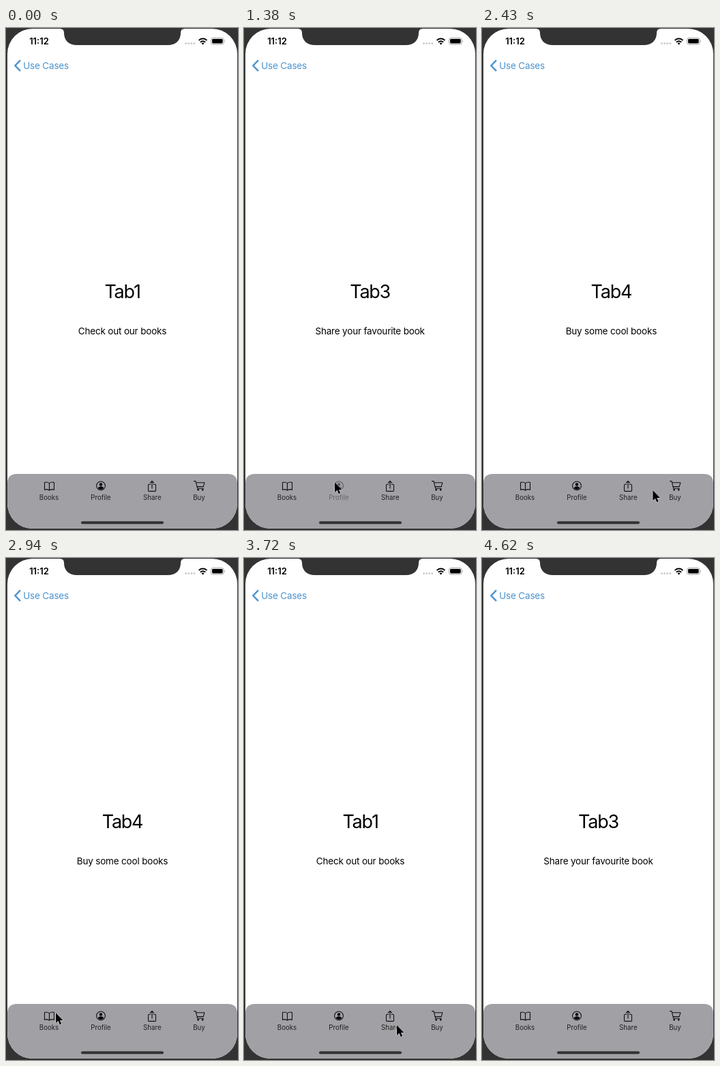
Recreate the animation shown at these times as an HTML page. Size 340 px wide and 734 px high, loop 4680 ms.

```html
<!DOCTYPE html>
<html lang="en">
<head>
<meta charset="utf-8">
<title>Tabs</title>
<style>
  html, body { margin: 0; width: 100%; height: 100%; overflow: hidden; background: #333; }
  svg { display: block; width: 340px; height: 734px; font-family: Inter, Roboto, sans-serif; }
  .title { font-size: 27px; letter-spacing: -1.25px; text-anchor: middle; }
  .body { font-size: 13.5px; letter-spacing: -.18px; }
  .mid { text-anchor: middle; }
  .clock { font-size: 13px; font-weight: 600; text-anchor: middle; }
  .label { font-size: 9.7px; text-anchor: middle; fill: #222; }
  .line { fill: none; stroke: #111; stroke-width: 1.1; stroke-linecap: round; stroke-linejoin: round; }
</style>
</head>
<body>
<svg viewBox="0 0 340 734">
  <defs>
    <clipPath id="screen"><rect x="2" y="1" width="337" height="731" rx="37"/></clipPath>
  </defs>
  <rect width="340" height="734" fill="#333"/>
  <g clip-path="url(#screen)">
    <rect width="340" height="734" fill="#fff"/>
    <g id="pages"></g>

    <path d="M79 0V1Q85 1 85 7C85 18 92 25 104 25H237C249 25 256 18 256 7Q256 1 262 1V0Z" fill="#333"/>
    <text class="clock" x="48.5" y="24">11:12</text>
    <g fill="#ccc">
      <circle cx="263.6" cy="22.5" r="1.5"/><circle cx="267.7" cy="22.5" r="1.5"/>
      <circle cx="271.8" cy="22.5" r="1.5"/><circle cx="275.9" cy="22.5" r="1.5"/>
    </g>
    <g fill="none" stroke="#000" stroke-width="2">
      <path d="M282.6 18.1a8.2 8.2 0 0 1 11.8 0"/>
      <path d="M284.9 20.7a5 5 0 0 1 7.2 0"/>
    </g>
    <path d="M288.5 24.6l-2-2.1a2.9 2.9 0 0 1 4 0z"/>
    <rect x="300.5" y="14.6" width="18.6" height="9.4" rx="2.6" fill="none" stroke="#999" stroke-width=".9"/>
    <rect x="302" y="16.1" width="15.6" height="6.4" rx="1.4"/>
    <path d="M320.2 17.7q1.5 1.6 0 3.2z" fill="#999"/>

    <path d="M21 47.2L13.4 55L21 62.8" fill="none" stroke="#4a93ce" stroke-width="2.4"/>
    <text class="body" x="25.2" y="60" fill="#4a93ce">Use Cases</text>

    <path d="M2 734V666Q2 652 16 652H325Q339 652 339 666V734Z" fill="#a1a0a5"/>
    <g class="tab">
      <path class="line" d="M63.5 665.6Q60 663 56.5 664.6V675.2Q60 673.8 63.5 676Q67 673.8 70.5 675.2V664.6Q67 663 63.5 665.6V676"/>
      <text class="label" x="63" y="689.5">Books</text>
    </g>
    <g class="tab">
      <circle class="line" cx="139" cy="669.4" r="6.4"/>
      <circle cx="139" cy="667.4" r="2.2"/>
      <path d="M134.7 672.8Q135.6 670.3 139 670.3T143.3 672.8Q141.6 674.7 139 674.7T134.7 672.8Z"/>
      <text class="label" x="139" y="689.5">Profile</text>
    </g>
    <g class="tab">
      <path class="line" d="M211.8 667.3H209.6Q208.5 667.3 208.5 668.4V676.3Q208.5 677.4 209.6 677.4H218.4Q219.5 677.4 219.5 676.3V668.4Q219.5 667.3 218.4 667.3H216.2M214 673V662.5M211.4 665L214 662.4L216.6 665"/>
      <text class="label" x="214.3" y="689.5">Share</text>
    </g>
    <g class="tab">
      <path class="line" d="M275.5 662.6H278L280.6 673.2H289.4M278.6 664.8H290.8L289.2 670.6H280"/>
      <circle cx="281.6" cy="675.3" r="1.2"/><circle cx="288.2" cy="675.3" r="1.2"/>
      <text class="label" x="283" y="689.5">Buy</text>
    </g>
    <rect x="110" y="721.3" width="121" height="4" rx="2" fill="#333"/>
  </g>
  <path id="cursor" d="M0 0V15L3.5 11.8L5.8 17.2L8.3 16.1L6 10.9H10.7Z" stroke="#fff" stroke-width="1" paint-order="stroke"/>
</svg>
<script>
const LOOP = 4680, STEP = 30, PAGE = 337;
const FADE = 0.55;

const captions = ["Check out our books", "Your profile", "Share your favourite book", "Buy some cool books"];

// time the page starts to slide, tab it goes to
const taps = [[290, 1], [684, 2], [1343, 1], [2160, 3], [3120, 0], [4080, 2]];
const SLIDE = 300;

// time, x, y of the pointer tip
const route = [
  [0, 152, 740], [200, 137, 668], [350, 137, 668],
  [640, 219, 679], [850, 219, 679],
  [1320, 133, 664], [1460, 133, 664],
  [2050, 281, 678], [2280, 281, 678],
  [2900, 73, 665], [3220, 73, 665],
  [3690, 224, 683], [4180, 224, 683],
  [4500, 236, 740]
];

const pages = document.getElementById("pages");
const cursor = document.getElementById("cursor");
const tabs = document.querySelectorAll(".tab");

pages.innerHTML = captions.map((text, i) => {
  const x = 170.5 + i * PAGE;
  return `<text class="title" x="${x}" y="395.3">Tab${i + 1}</text>` +
    `<text class="body mid" x="${x}" y="448">${text}</text>`;
}).join("");

const clamp = x => Math.max(0, Math.min(1, x));
const ease = x => { x = clamp(x); return x * x * (3 - 2 * x); };
const mix = (a, b, k) => a + (b - a) * k;

function scrollAt(t) {
  let pos = 0;
  for (const [start, tab] of taps) pos = mix(pos, tab, ease((t - start) / SLIDE));
  return pos;
}

function pressAt(t, tab) {
  let press = 0;
  for (const [start, target] of taps) {
    if (target !== tab) continue;
    const dt = t - start;
    press = Math.max(press, Math.min(clamp((dt + 80) / 40), clamp((240 - dt) / 120)));
  }
  return press;
}

function pointerAt(t) {
  let i = route.findIndex(p => p[0] > t);
  if (i < 0) i = route.length - 1;
  const [t0, x0, y0] = route[i - 1], [t1, x1, y1] = route[i];
  const k = ease((t - t0) / (t1 - t0));
  return [mix(x0, x1, k), mix(y0, y1, k)];
}

function draw(t) {
  pages.setAttribute("transform", `translate(${-scrollAt(t) * PAGE} 0)`);
  tabs.forEach((tab, i) => tab.setAttribute("opacity", 1 - FADE * pressAt(t, i)));
  const [x, y] = pointerAt(t);
  cursor.setAttribute("transform", `translate(${x} ${y})`);
}

const begin = performance.now();
function tick() {
  const t = (performance.now() - begin) % LOOP;
  draw(Math.floor(t / STEP) * STEP);
  requestAnimationFrame(tick);
}
draw(0);
requestAnimationFrame(tick);
</script>
</body>
</html>
```
